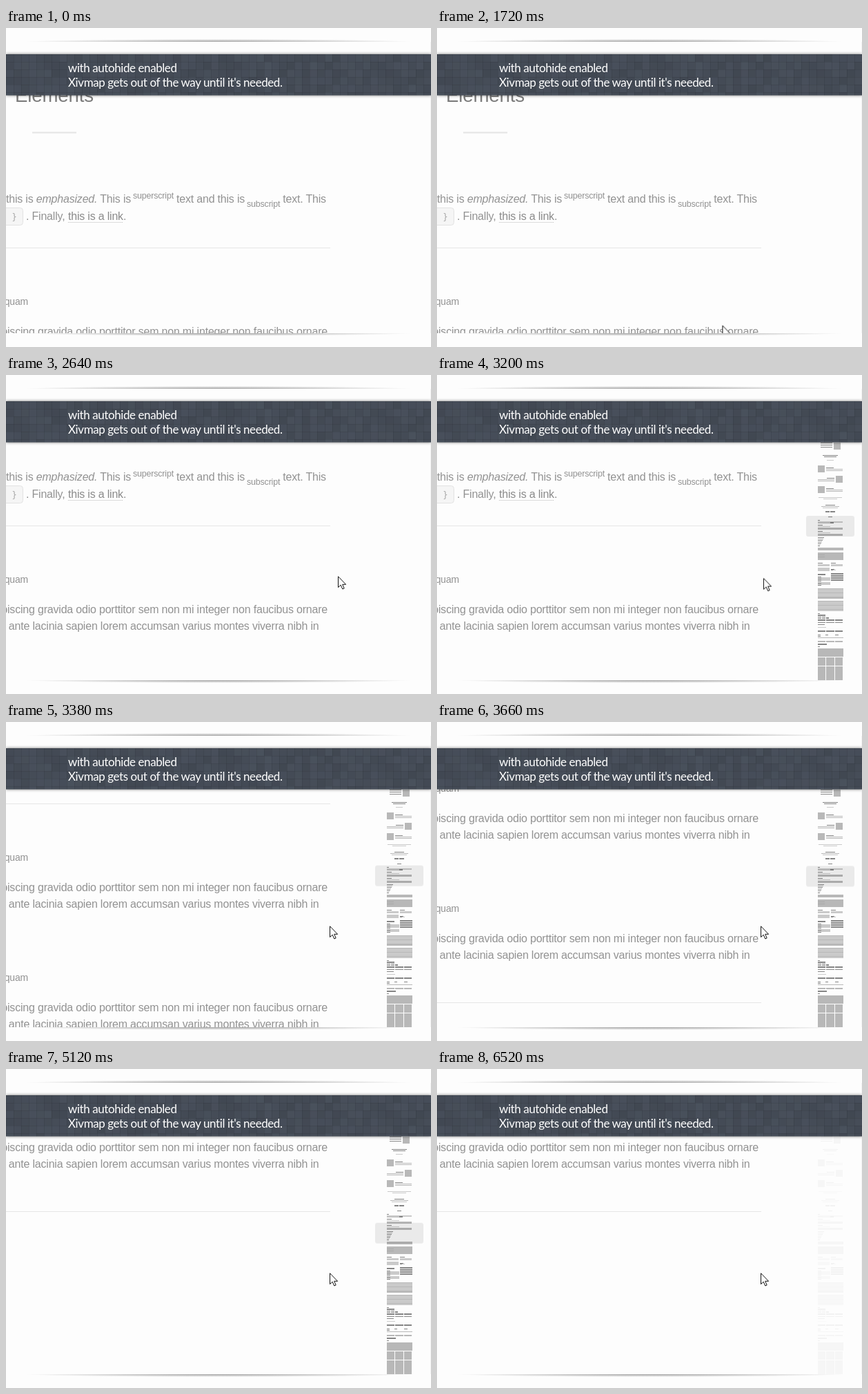
These frames come from a looping animation (616x462 px, 8000 ms). An HTML page:

```html
<!DOCTYPE html>
<html lang="en">
<head>
<meta charset="utf-8">
<title>Autohide minimap</title>
<style>
  html, body { margin: 0; width: 100%; height: 100%; overflow: hidden; background: #fdfdfd; }
  svg { display: block; width: 616px; height: 462px; }
  text { font: 16px "Liberation Sans", Arial, sans-serif; letter-spacing: -.2px; fill: #929292; }
  .end { text-anchor: end; }
  .small { font-size: 12.5px; }
  .sub { font-size: 14px; }
  .title { font-size: 27.7px; fill: #7c7c7c; text-anchor: middle; }
  .code { font: 12px "DejaVu Sans Mono", monospace; fill: #a4a4a4; }
  .caption { font: 17px Lato, sans-serif; letter-spacing: -.42px; fill: #fff; }
  .rule { stroke: #e6e6e6; }
  .bar { filter: drop-shadow(0 0 2px rgba(0, 0, 0, .55)); }
  #map { shape-rendering: crispEdges; }

  #page, #cursor, #map, #view { animation: 8s linear infinite; }
  #page { animation-name: scroll; animation-timing-function: step-end; }
  #cursor { animation-name: point; }
  #map { animation-name: map; }
  #view { animation-name: view, slide; }

  @keyframes scroll {
    0% { transform: translateY(0); }
    32.95% { transform: translateY(-100px); }
    40.45% { transform: translateY(-200px); }
    45.7% { transform: translateY(-300px); }
    49.95% { transform: translateY(-400px); }
    54.7%, 100% { transform: translateY(-500px); }
  }
  @keyframes point {
    0%, 21.25% { transform: translate(406px, 446px); }
    21.5% { transform: translate(413px, 431px); animation-timing-function: ease-out; }
    25.25%, 38.5% { transform: translate(481px, 291px); }
    40.75%, 100% { transform: translate(469px, 295px); }
  }
  @keyframes map {
    0%, 33.25% { opacity: 0; animation-timing-function: ease; }
    37%, 78% { opacity: 1; animation-timing-function: ease; }
    81.5%, 100% { opacity: .09; }
  }
  @keyframes view {
    0%, 33.25% { opacity: 0; animation-timing-function: ease; }
    37%, 78% { opacity: 1; animation-timing-function: ease; }
    81.5%, 100% { opacity: 0; }
  }
  @keyframes slide {
    0%, 40.5% { transform: translateY(204px); animation-timing-function: ease-in-out; }
    43%, 45.75% { transform: translateY(208.5px); animation-timing-function: ease-in-out; }
    48.25%, 50% { transform: translateY(213.3px); animation-timing-function: ease-in-out; }
    52.5%, 54.75% { transform: translateY(218px); animation-timing-function: ease-in-out; }
    57.25%, 100% { transform: translateY(222.7px); }
  }
</style>
</head>
<body>
<svg viewBox="0 0 616 462">
  <defs>
    <radialGradient id="fade">
      <stop offset="0" stop-color="#777" stop-opacity=".65"/>
      <stop offset=".45" stop-color="#777" stop-opacity=".4"/>
      <stop offset="1" stop-color="#777" stop-opacity="0"/>
    </radialGradient>
    <clipPath id="stage"><path d="M0 20H616V442H0z"/></clipPath>
    <clipPath id="above"><path d="M0 0H616V20H0z"/></clipPath>
    <clipPath id="below"><path d="M0 442H616V462H0z"/></clipPath>
    <g id="passage">
      <text class="sub end" x="32" y="401">aliquam</text>
      <text class="end" x="466" y="445">adipiscing gravida odio porttitor sem non mi integer non faucibus ornare</text>
      <text class="end" x="453.5" y="469">nisl ante lacinia sapien lorem accumsan varius montes viverra nibh in</text>
    </g>
  </defs>

  <ellipse cx="308" cy="20" rx="282" ry="4" fill="url(#fade)" clip-path="url(#above)"/>
  <ellipse cx="308" cy="442" rx="282" ry="4" fill="url(#fade)" clip-path="url(#below)"/>

  <g clip-path="url(#stage)">
    <path d="M615.5 20V442" stroke="#f3f3f3"/>
    <g id="page">
      <text class="title" x="70" y="107">Elements</text>
      <path d="M38 151.5H102" stroke="#e4e4e4" stroke-width="2"/>
      <text x="0" y="253">this is <tspan font-style="italic">emphasized.</tspan> This is</text>
      <text class="small" x="184" y="247">superscript</text>
      <text x="247" y="253">text and this is</text>
      <text class="small" x="349" y="259">subscript</text>
      <text x="401.3" y="253">text. This</text>
      <rect x="-20" y="260.5" width="44.5" height="25" rx="4" fill="#f5f5f5" stroke="#e2e2e2"/>
      <text class="code" x="8.5" y="278">}</text>
      <text x="29" y="278">. Finally,</text>
      <text x="90" y="278" style="fill:#8a8a8a">this is a link<tspan fill="#929292">.</tspan></text>
      <path d="M90 281.5H170" stroke="#bbb" stroke-dasharray="1 1"/>
      <path class="rule" d="M0 318.5H470M0 706.5H470"/>
      <use href="#passage"/>
      <use href="#passage" y="173.5"/>
    </g>

    <g id="map"></g>
    <rect id="view" x="535" width="70" height="30" rx="3" fill="#000" fill-opacity=".075"/>

    <rect class="bar" y="38" width="616" height="59.5" fill="#454c57"/>
    <g id="tiles"></g>
    <text class="caption" x="90" y="64">with autohide enabled</text>
    <text class="caption" x="90" y="85">Xivmap gets out of the way until it's needed.</text>

    <path id="cursor" d="M.5 .8V16.6L4.2 13.2 6.8 19 9.2 18 6.7 12.3H11.6z" fill="#fff" stroke="#111"/>
  </g>
</svg>
<script>
  const $ = id => document.getElementById(id);

  function rect(parent, x, y, w, h, fill, alpha = 1) {
    const r = document.createElementNS('http://www.w3.org/2000/svg', 'rect');
    Object.entries({ x, y, width: w, height: h, fill, 'fill-opacity': alpha })
      .forEach(([k, v]) => r.setAttribute(k, v));
    parent.append(r);
  }

  let seed = 11;
  const rand = () => (seed = seed * 16807 % 2147483647) / 2147483647;

  // Subtle checkered texture of the bar
  const cell = 11;
  for (let y = 38; y < 97; y += cell)
    for (let x = 0; x < 616; x += cell) {
      const h = Math.min(cell, 97.5 - y);
      rect($('tiles'), x, y, cell, h, rand() < .5 ? '#000' : '#8090a0', rand() * .06);
      rect($('tiles'), x, y, cell, 1, '#000', .08);
      rect($('tiles'), x, y, 1, h, '#000', .08);
    }

  // Minimap of the page, drawn in three tones
  const LIGHT = '#cacaca', MID = '#b8b8b8', DARK = '#858585';
  const LEFT = 552, FULL = 37;
  const box = (x, y, w, h = 1, c = LIGHT) => rect($('map'), x, y, w, h, c);
  const rows = (x, y, w, n, gap, c, h = 1) => {
    for (let i = 0; i < n; i++) box(x, y + i * gap, w, h, c);
  };
  const centred = (y, w, c, h) => box(570 - w / 2, y, w, h, c);
  const card = (y, flip) => {
    box(flip ? 578 : LEFT, y, 10, 10, MID);
    box(flip ? 565 : 564, y + 3, 11, 1, DARK);
    rows(flip ? LEFT : 564, y + 5, 24, 2, 2, MID);
  };
  const broken = (y, parts, c, h) => {
    const w = FULL / parts;
    for (let i = 0; i < parts; i++) box(LEFT + i * w, y, w - 1, h, c);
  };

  rows(556, 98, 17, 3, 3, DARK);
  box(575, 98, 10, 10, MID);
  centred(116, 22, DARK);
  centred(118, 18, DARK);
  centred(123, 10);
  card(131);
  card(146, true);
  card(161);
  centred(177, 34);
  centred(179, 20);
  centred(188, 14, DARK);
  centred(190, 26, MID);
  centred(192, 22);
  box(563, 197, 6, 2, DARK);
  box(570, 197, 7, 2, DARK);
  centred(205, 6, DARK);

  box(LEFT, 210, 3, 1, DARK);
  box(LEFT, 212, 36, 2);
  box(LEFT, 214, 18, 1, MID);
  box(570, 213, 5, 2, DARK);
  for (const y of [217, 226]) {
    box(LEFT, y, 7, 1, DARK);
    box(LEFT, y + 2, 18, 1);
    box(LEFT, y + 4, FULL - 1, 3, MID);
  }
  for (let i = 0; i < 7; i++) box(LEFT, 235 + i * 2, 9 - i, 1, i % 2 ? MID : DARK);
  box(LEFT, 250, FULL, 4, MID);
  box(LEFT, 257, FULL, 11, MID);
  rows(LEFT, 260, 10, 2, 3, '#a8a8a8');

  for (const x of [LEFT, 571]) {
    box(x, 272, 7, 1, DARK);
    box(x, 274, 17, 3);
    box(x, 281, 5, 2, DARK);
  }
  box(LEFT, 279, 17, 5);
  box(574, 282, 4, 1);
  rows(571, 287, 18, 4, 3, DARK, 2);
  box(LEFT, 288, 11, 2, DARK);
  box(LEFT, 293, 18, 5);
  box(LEFT, 300, 18, 4);
  rows(LEFT, 292, 5, 5, 3, DARK);

  box(LEFT, 309, FULL, 12);
  box(LEFT, 322, FULL, 2, MID);
  box(LEFT, 327, FULL, 15);
  rows(LEFT, 309, FULL, 6, 6, MID);

  box(LEFT, 345, 3, 1, DARK);
  box(LEFT, 347, 11, 2, DARK);
  rows(LEFT, 350, 5, 2, 2, DARK);
  rows(558, 350, 5, 2, 2, DARK);
  box(564, 351, 4, 2, DARK);
  broken(354, 3, DARK, 2);
  broken(358, 3, DARK, 1);
  box(LEFT, 361, 10, 1, DARK);
  box(LEFT, 365, 12, 1);
  broken(370, 3, DARK, 2);
  rows(LEFT, 376, 4, 2, 2, DARK);
  box(563, 376, 4, 1, DARK);
  box(577, 376, 5, 1, DARK);
  box(LEFT, 380, FULL, 1, MID);
  broken(385, 3, MID, 2);
  box(LEFT, 389, 13, 2, DARK);
  box(LEFT, 393, 3, 1, DARK);
  box(LEFT, 396, FULL, 12, MID);
  broken(409, 3, MID, 12);
  broken(422, 3, MID, 20);
</script>
</body>
</html>
```
